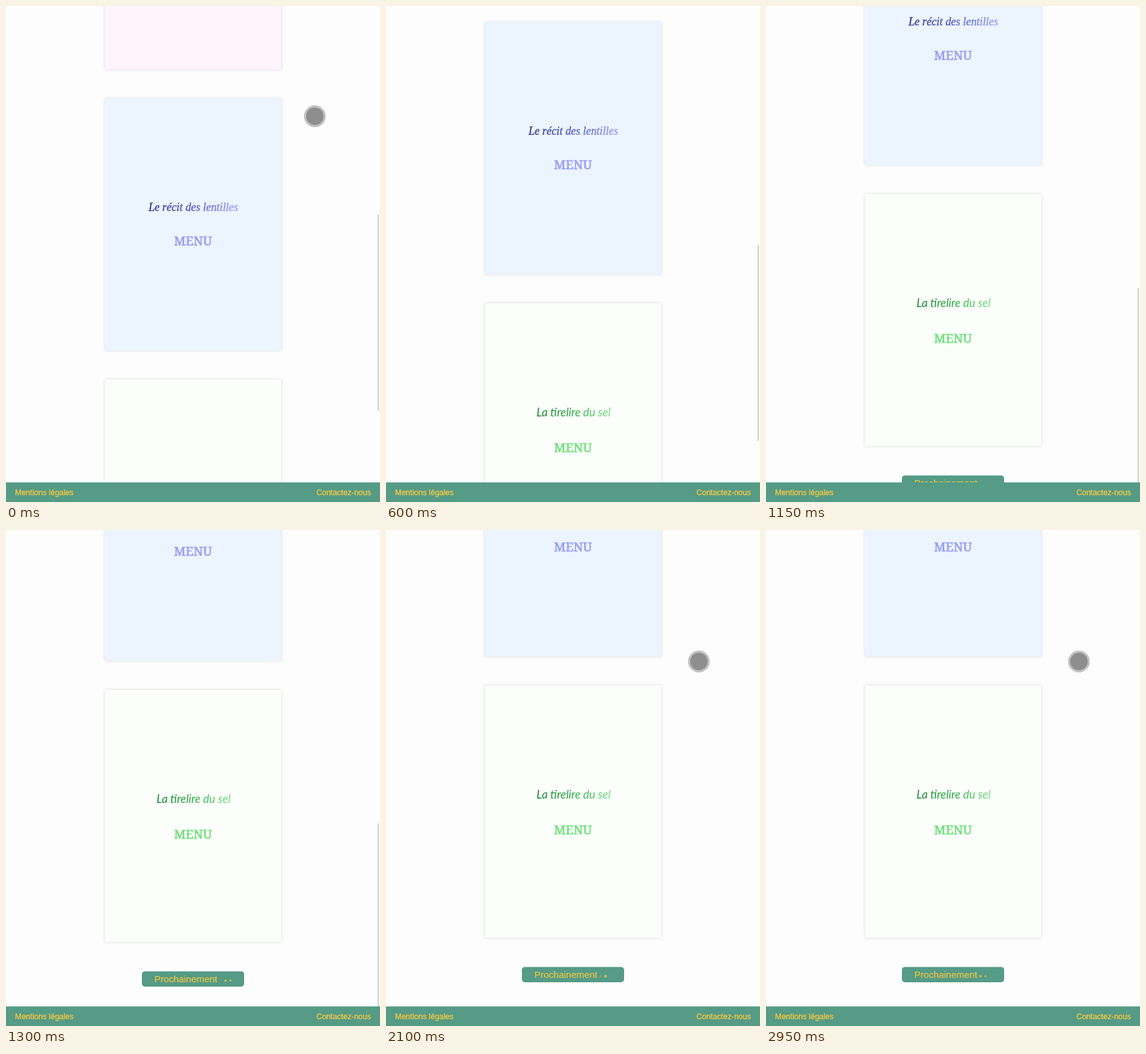
Animation, 600 px wide and 794 px high, one loop 3000 ms. Source, as an HTML page:

```html
<!DOCTYPE html>
<html lang="fr">
<head>
<meta charset="utf-8">
<title>Menus</title>
<style>
  html, body { margin: 0; width: 100%; height: 100%; overflow: hidden; background: #fdfdfd; }
  svg { display: block; width: 100vw; height: 100vh; }
  .card { filter: drop-shadow(0 0 2.5px rgba(0, 0, 0, .14)); }
  .menu { font: 500 20px "Noto Serif", serif; stroke-width: .75; text-anchor: middle; }
  .title { text-anchor: middle; }
  .serif { font: italic 17.8px "Liberation Serif", serif; stroke: url(#blue); stroke-width: .4; }
  .hand { font: italic 18.4px Lato, sans-serif; }
  .gold { fill: #eec646; font-family: "Liberation Sans", Arial, sans-serif; }
  .link { font-size: 12.5px; stroke: #eec646; stroke-width: .4; }
  .soon { font-size: 15px; stroke: #eec646; stroke-width: .2; }
</style>
</head>
<body>
<svg viewBox="0 0 600 794">
  <defs>
    <linearGradient id="blue">
      <stop offset="0" stop-color="#2f3b86"/>
      <stop offset=".5" stop-color="#5a65c0"/>
      <stop offset="1" stop-color="#9aa3f8"/>
    </linearGradient>
    <linearGradient id="green">
      <stop offset="0" stop-color="#12852a"/>
      <stop offset=".5" stop-color="#30ad45"/>
      <stop offset="1" stop-color="#74e282"/>
    </linearGradient>
  </defs>

  <g id="page">
    <rect class="card" x="159" y="-302" width="282.5" height="403.5" fill="#fff4fc"/>
    <rect class="card" x="159" y="148" width="282.5" height="403.5" fill="#ecf4fe"/>
    <rect class="card" x="159" y="598" width="282.5" height="403.5" fill="#fcfefc"/>
    <text class="title serif" x="300.5" y="328" fill="url(#blue)">Le récit des lentilles</text>
    <text class="menu" x="300" y="382.5" fill="#99a1f3" stroke="#99a1f3">MENU</text>
    <text class="title hand" x="301" y="779" fill="url(#green)">La tirelire du sel</text>
    <text class="menu" x="300" y="835.5" fill="#74e27f" stroke="#74e27f">MENU</text>
    <rect x="218" y="1048.4" width="164" height="24.6" rx="5" fill="#559b85"/>
    <text class="gold soon" x="238" y="1065.5">Prochainement</text>
    <g id="dots" class="gold">
      <circle cx="344" cy="1063.3" r="2"/>
      <circle cx="352.3" cy="1063.3" r="2"/>
      <circle cx="360" cy="1063.3" r="2"/>
    </g>
  </g>

  <rect id="bar" x="596.6" width="1.2" height="314" fill="#adadad"/>
  <rect y="762.6" width="600" height="31.4" fill="#559b85"/>
  <text class="gold link" x="14.5" y="783">Mentions légales</text>
  <text class="gold link" x="585.5" y="783" text-anchor="end">Contactez-nous</text>

  <g id="touch">
    <circle r="17.5" fill="#c2c2c2"/>
    <circle r="14" fill="#8e8e8e"/>
  </g>
</svg>
<script>
  const LOOP = 3000, STEP = 50;
  const $ = id => document.getElementById(id);
  const page = $("page"), bar = $("bar"), touch = $("touch");
  const dots = [...$("dots").children];

  // [time, scroll offset]
  const scrollKeys = [
    [0, 0], [50, 40], [100, 82], [150, 111], [200, 122], [850, 122], [900, 131],
    [950, 153], [1000, 188], [1100, 264], [1150, 297], [1200, 319], [1300, 342], [1400, 349]
  ];
  // [from, to, x, y]
  const touches = [
    [0, 100, 495.5, 176.5], [800, 1050, 478, 553.5], [1400, LOOP, 502, 210.5]
  ];

  function valueAt(keys, t) {
    const i = keys.findIndex(k => k[0] > t);
    if (i < 0) return keys[keys.length - 1][1];
    const [t0, a] = keys[i - 1], [t1, b] = keys[i];
    return a + (b - a) * (t - t0) / (t1 - t0);
  }

  function draw(t) {
    const scroll = valueAt(scrollKeys, t);
    page.setAttribute("transform", `translate(0 ${-scroll})`);
    bar.setAttribute("y", 334 + scroll * .396);
    bar.setAttribute("opacity", valueAt([[0, 1], [1750, 1], [1950, 0]], t));

    const spot = touches.find(([from, to]) => t >= from && t < to);
    touch.setAttribute("visibility", spot ? "visible" : "hidden");
    if (spot) touch.setAttribute("transform", `translate(${spot[2]} ${spot[3]})`);

    // Each dot pulses once a second, a third of a second after the one before
    dots.forEach((dot, i) => {
      const phase = (t - 1650) / 1000 - (i - 1) / 3;
      const glow = .5 - .5 * Math.cos(2 * Math.PI * phase);
      dot.setAttribute("opacity", .08 + .87 * glow);
      dot.setAttribute("r", 1.2 + .8 * glow);
    });
  }

  const start = performance.now();
  function tick() {
    const t = (performance.now() - start) % LOOP;
    draw(Math.floor(t / STEP) * STEP);
    requestAnimationFrame(tick);
  }
  tick();
</script>
</body>
</html>
```
